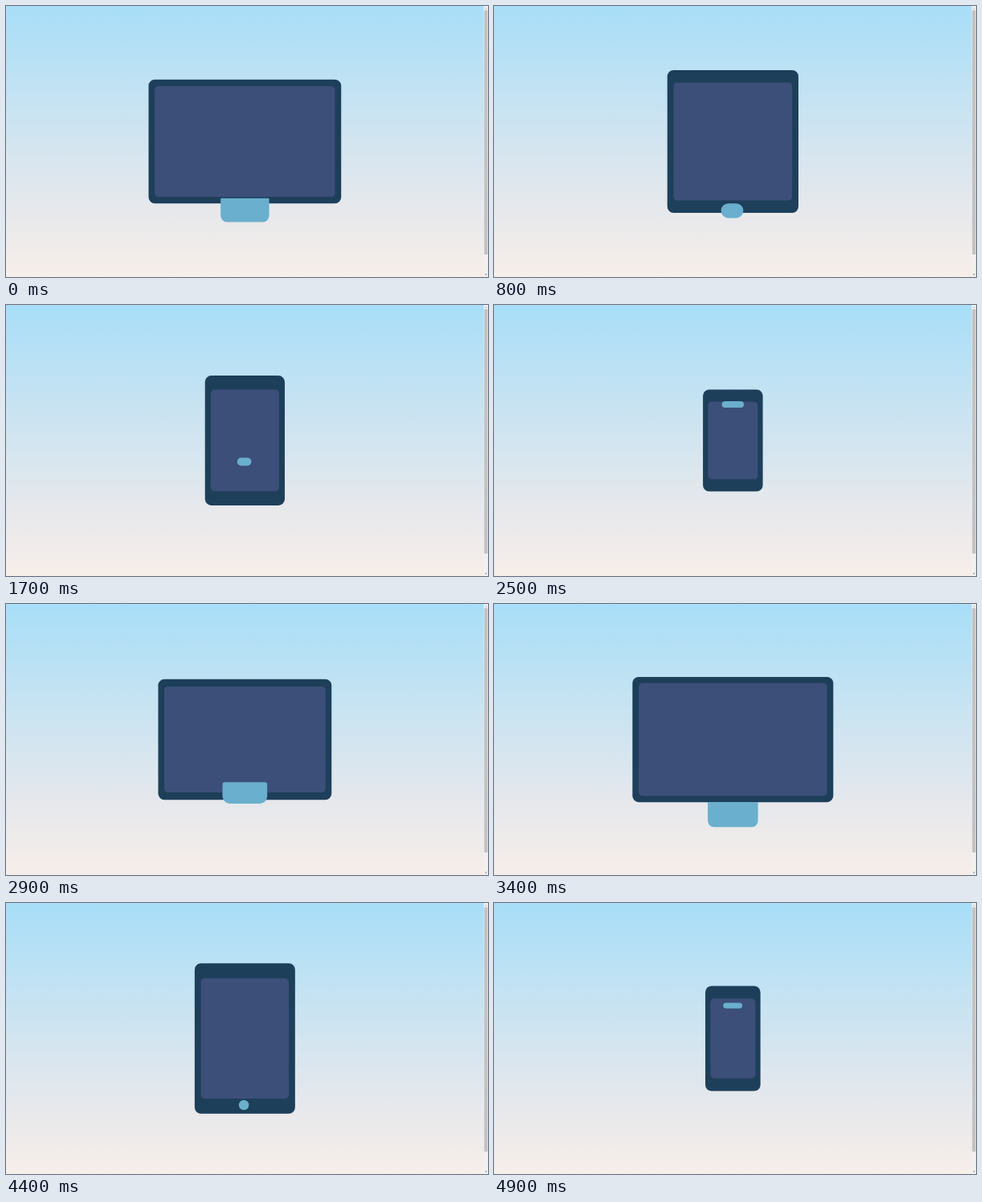
Animation of 600x338 px, one loop 5000 ms. Source, as an HTML page:

```html
<!DOCTYPE html>
<html lang="en">
<head>
<meta charset="utf-8">
<title>Responsive device</title>
<style>
  html, body { margin: 0; width: 100%; height: 100%; overflow: hidden; }
  svg { display: block; width: 100%; height: 100%; }
</style>
</head>
<body>
<svg viewBox="0 0 600 338" preserveAspectRatio="none">
  <defs>
    <linearGradient id="sky" x1="0" y1="0" x2="0" y2="1">
      <stop offset="0" stop-color="#a8def8"/>
      <stop offset=".74" stop-color="#e6e8ec"/>
      <stop offset="1" stop-color="#f7eee9"/>
    </linearGradient>
  </defs>
  <rect width="600" height="338" fill="url(#sky)"/>
  <path id="body" fill="#1e3f5a"/>
  <path id="screen" fill="#3c4f79"/>
  <path id="button" fill="#6aafcd"/>
  <g id="scrollbar">
    <rect x="594.7" width="5.3" height="338" fill="#f1f1f1"/>
    <rect x="595.3" y="5.3" width="4.1" height="304.7" fill="#c1c1c1"/>
    <path d="M596.2 3.4h2.4l-1.2-1.3z" fill="#a3a3a3"/>
    <path d="M596.2 334.4h2.4l-1.2 1.3z" fill="#505050"/>
  </g>
</svg>
<script>
const LOOP = 5000, CYCLE = 3000, STEP = 100;
const CX = 297.35, CY = 169;

// body and screen: [width, height]; button: [cx, cy, width, height, top radius, bottom radius]
const desktop = { body: [250, 156.25], screen: [234.4, 140.6], button: [CX, 262.7, 62.5, 31.25, 0, 7.8] };
const tablet = { body: [125, 187.5], screen: [109.4, 150], button: [296.1, 252, 12.5, 12.5, 15.6, 15.6] };
const phone = { body: [62.5, 125], screen: [50.2, 93.75], button: [CX, 114.5, 25, 6.25, 15.6, 15.6] };

const moves = [
  { from: desktop, to: tablet, start: 430, length: 600 },
  { from: tablet, to: phone, start: 1431, length: 600 },
  { from: phone, to: desktop, start: 2365, length: 760 }
];

// cubic-bezier(.42, 0, .58, 1)
function easeInOut(x) {
  if (x <= 0) return 0;
  if (x >= 1) return 1;
  let lo = 0, hi = 1;
  for (let i = 0; i < 30; i++) {
    const s = (lo + hi) / 2, r = 1 - s;
    if (3 * r * r * s * 0.42 + 3 * r * s * s * 0.58 + s * s * s < x) lo = s;
    else hi = s;
  }
  return lo * lo * (3 - 2 * lo);
}

function roundRect(cx, cy, w, h, top, bottom) {
  const limit = Math.min(w, h) / 2;
  const a = Math.min(top, limit), b = Math.min(bottom, limit);
  const x = cx - w / 2, y = cy - h / 2;
  return `M${x + a} ${y}h${w - 2 * a}a${a} ${a} 0 0 1 ${a} ${a}v${h - a - b}` +
    `a${b} ${b} 0 0 1 ${-b} ${b}h${2 * b - w}a${b} ${b} 0 0 1 ${-b} ${-b}` +
    `v${a + b - h}a${a} ${a} 0 0 1 ${a} ${-a}z`;
}

function draw(id, ...shape) {
  document.getElementById(id).setAttribute("d", roundRect(...shape));
}

function render(time) {
  const t = Math.floor((time % LOOP) / STEP) * STEP % CYCLE;
  // the return to the desktop runs past the end of the cycle
  const phase = t < moves[0].start ? t + CYCLE : t;
  const move = moves.filter(m => m.start <= phase).pop();
  const k = easeInOut((phase - move.start) / move.length);
  const mix = part => move.from[part].map((v, i) => v + (move.to[part][i] - v) * k);

  draw("body", CX, CY, ...mix("body"), 7.8, 7.8);
  draw("screen", CX, CY, ...mix("screen"), 4.7, 4.7);
  draw("button", ...mix("button"));
}

const origin = performance.now();
function tick() {
  render(performance.now() - origin);
  requestAnimationFrame(tick);
}
tick();
</script>
</body>
</html>
```
